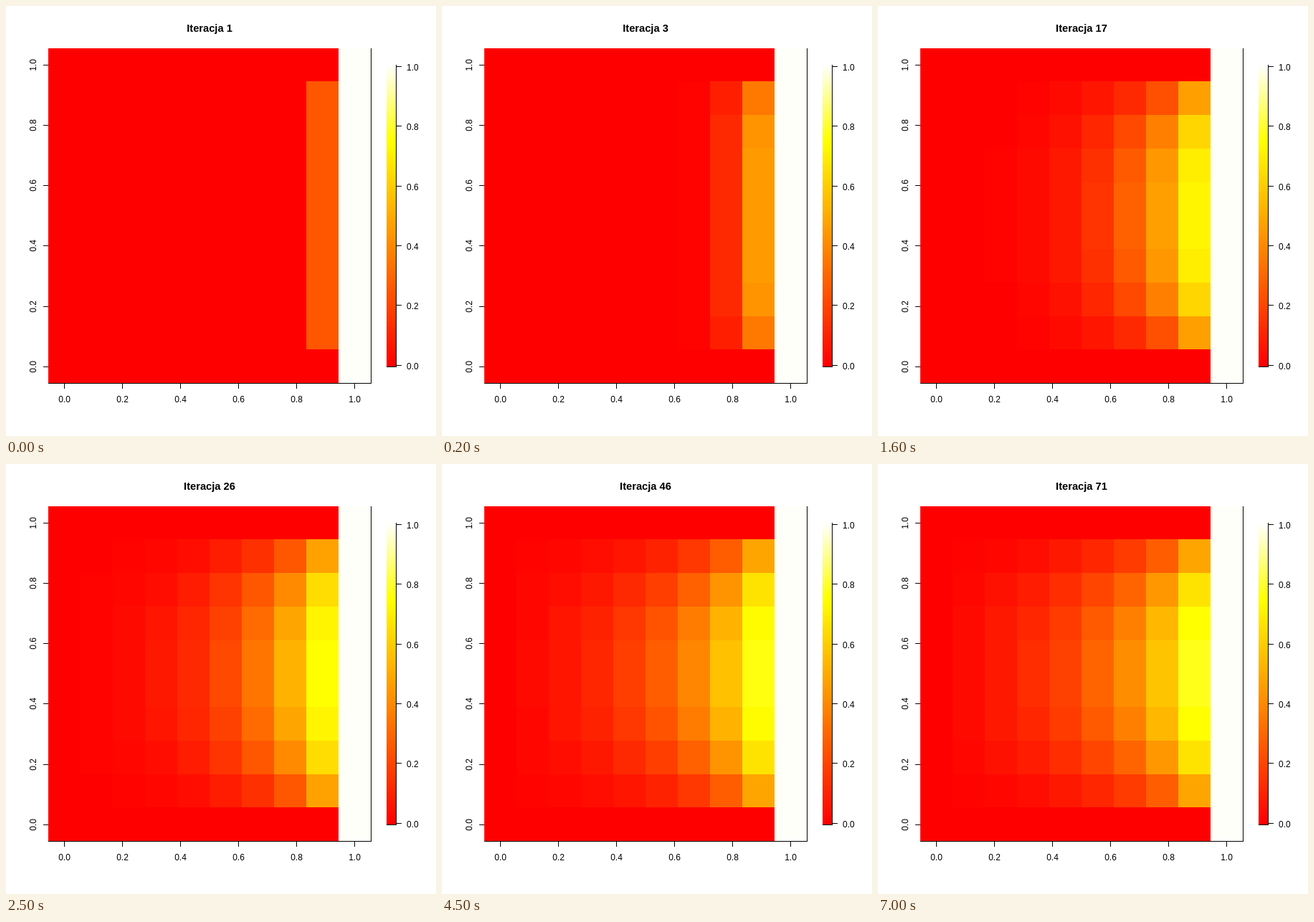
An HTML page with a canvas that plays this animation: 600x600 px, repeating every 7100 ms.

```html
<!DOCTYPE html>
<html lang="pl">
<head>
<meta charset="utf-8">
<title>Iteracja</title>
<style>
  html, body { margin: 0; width: 100%; height: 100%; overflow: hidden; background: #fff; }
  canvas { display: block; }
</style>
</head>
<body>
<canvas id="plot" width="600" height="600"></canvas>
<script>
const ctx = document.getElementById('plot').getContext('2d', { alpha: false });
const SIZE = 10, COLORS = 100, STEPS = 71, STEP_MS = 100;
const LABEL_FONT = '12px "Liberation Sans", Arial, sans-serif';
const TITLE_FONT = 'bold 14.7px "Liberation Sans", Arial, sans-serif';
const LEFT = 59.04, TOP = 59.04, CELL_W = 45, CELL_H = 46.752;
const BAR_TOP = 82.4, BAR_STEP = 4.2077;

// Red to yellow over three quarters of the scale, then yellow to near white.
function heatColor(i) {
  const green = i < 75 ? 255 * i / 74 : 255;
  const blue = i < 75 ? 0 : 255 * (0.02 + 0.04 * (i - 75));
  return `rgb(255,${Math.round(green)},${Math.round(blue)})`;
}

const palette = Array.from({ length: COLORS }, (_, i) => heatColor(i));
const colorOf = z => palette[Math.min(COLORS - 1, Math.floor(z * COLORS))];

// One Jacobi step of the Laplace equation; the border stays fixed.
function relax(grid) {
  const inside = i => i > 0 && i < SIZE - 1;
  return grid.map((column, x) => column.map((z, y) => inside(x) && inside(y)
    ? (grid[x - 1][y] + grid[x + 1][y] + column[y - 1] + column[y + 1]) / 4
    : z));
}

let grid = Array.from({ length: SIZE }, (_, x) => Array(SIZE).fill(x === SIZE - 1 ? 1 : 0));
const states = Array.from({ length: STEPS }, () => (grid = relax(grid)));

// Fills between edges snapped to whole pixels.
function fill(color, x0, y0, x1, y1) {
  const [l, t, r, b] = [x0, y0, x1, y1].map(Math.floor);
  ctx.fillStyle = color;
  ctx.fillRect(l, t, r - l, b - t);
}

function text(label, x, y, align = 'center', font = LABEL_FONT) {
  ctx.fillStyle = '#000';
  ctx.font = font;
  ctx.textAlign = align;
  ctx.fillText(label, x, y);
}

function drawAxes() {
  fill('#000', 509, 59, 510, 527);
  fill('#000', 59, 526, 510, 527);
  for (let i = 0; i <= 5; i++) {
    const label = (i / 5).toFixed(1);
    const x = 81 + 81 * i;
    const y = Math.floor(503.2 - 84.154 * i);
    const barY = Math.floor(501.1 - 83.313 * i);

    fill('#000', x, 527, x + 1, 534);
    text(label, x + 0.5, 553);

    fill('#000', 52, y, 59, y + 1);
    ctx.save();
    ctx.translate(42, y + 0.5);
    ctx.rotate(-Math.PI / 2);
    text(label, 0, 0);
    ctx.restore();

    fill('#000', 545, barY, 552, barY + 1);
    text(label, 559, barY + 6, 'left');
  }
}

function drawColorBar() {
  for (let i = 0; i < COLORS; i++) {
    const y = BAR_TOP + BAR_STEP * (COLORS - 1 - i);
    fill(palette[i], 531, y, 544, y + BAR_STEP);
  }
  fill('#000', 544, 82, 545, 504);
  fill('#000', 531, 503, 545, 504);
}

function drawMap(state) {
  state.forEach((column, i) => column.forEach((z, j) => {
    const x = LEFT + CELL_W * i, y = TOP + CELL_H * j;
    fill(colorOf(z), x, y, x + CELL_W, y + CELL_H);
  }));
}

function draw(now) {
  const step = Math.floor(now / STEP_MS) % STEPS;
  fill('#fff', 0, 0, 600, 600);
  drawAxes();
  drawColorBar();
  drawMap(states[step]);
  text(`Iteracja ${step + 1}`, 284, 36, 'center', TITLE_FONT);
}

let start;
function tick(now) {
  start ??= now;
  draw(now - start);
  requestAnimationFrame(tick);
}
draw(0);
requestAnimationFrame(tick);
</script>
</body>
</html>
```
